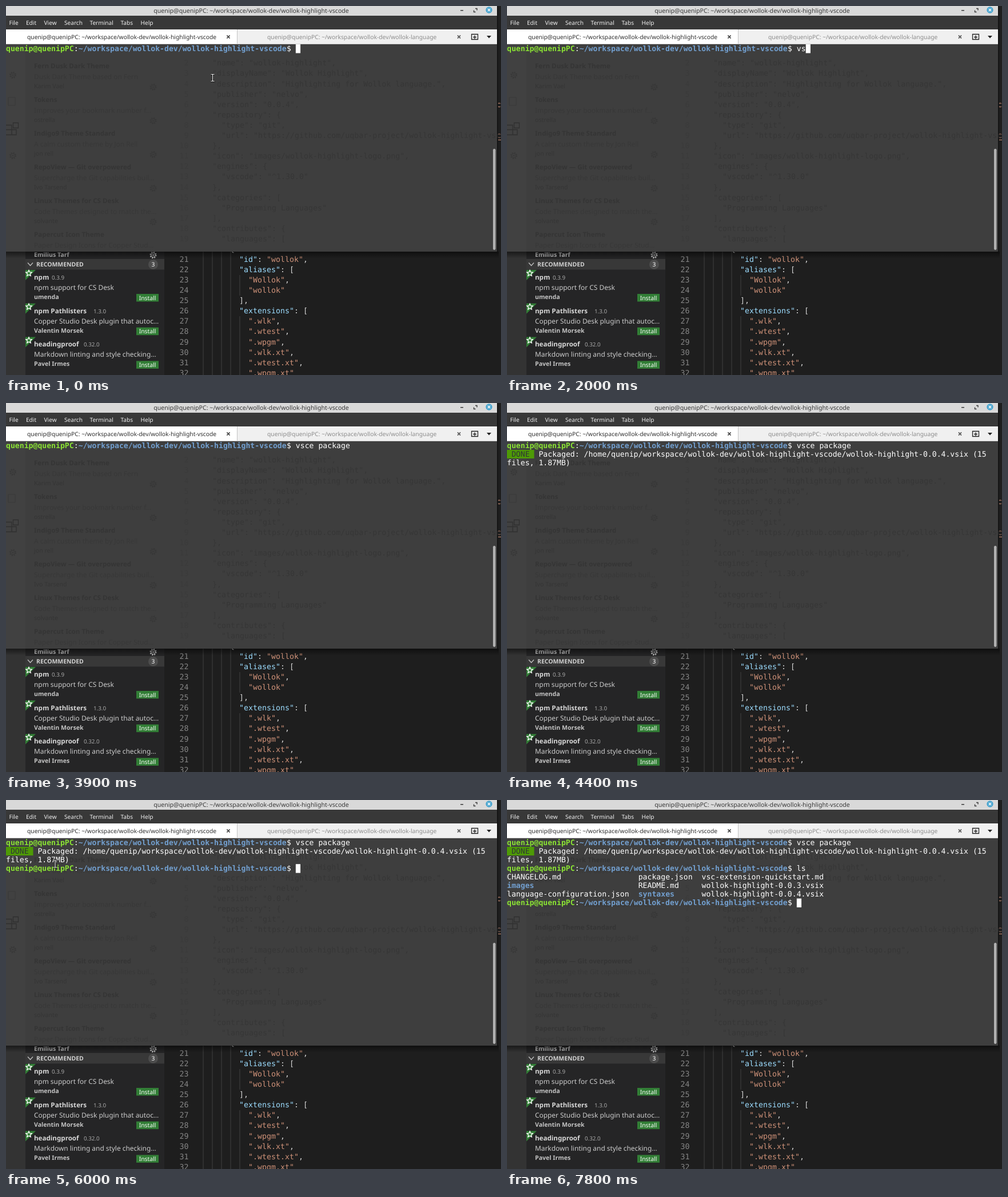
These frames come from a looping animation (866x646 px, 8 s). An HTML page:

```html
<!DOCTYPE html>
<html lang="en">
<head>
<meta charset="utf-8">
<title>Packaging an extension</title>
<style>
html, body { margin: 0; width: 100%; height: 100%; overflow: hidden; background: #1e1e1e; }
svg { display: block; width: 100vw; height: 100vh; }
text { white-space: pre; text-rendering: geometricPrecision; }
.ui { font-family: "Noto Sans", "Open Sans", sans-serif; }
.mono { font-family: "DejaVu Sans Mono", monospace; }
.b { font-weight: bold; }
</style>
</head>
<body>
<svg id="stage" viewBox="0 0 866 646"></svg>
<script>
const LOOP = 8000, COL = 7.92, ROW = 15.06, TOP = 67;
const USER = 'quenip@quenipPC';
const CWD = '~/workspace/wollok-dev/wollok-highlight-vscode';
const GREEN = '#8ae234', BLUE = '#729fcf', WHITE = '#ffffff';
const KEY = '#9cdcfe', STR = '#ce9178', PUN = '#d4d4d4', SHADE = '#323232';

const rect = (x, y, w, h, fill, more = '') =>
  `<rect x="${x}" y="${y}" width="${w}" height="${h}" fill="${fill}" ${more}/>`;
const path = (d, stroke, width = 1, fill = 'none') =>
  `<path d="${d}" stroke="${stroke}" stroke-width="${width}" fill="${fill}"/>`;
const text = (x, y, s, size, fill, cls = 'ui', more = '') =>
  `<text x="${x}" y="${y}" font-size="${size}" fill="${fill}" class="${cls}" ${more}>${s}</text>`;
const cross = (x, y, r, stroke, w) =>
  path(`M${x - r} ${y - r}l${2 * r} ${2 * r}m0 ${-2 * r}l${-2 * r} ${2 * r}`, stroke, w);

const star = (cx, cy) => {
  const pts = Array.from({ length: 10 }, (_, i) => {
    const r = i % 2 ? 2.5 : 5.5, a = i * Math.PI / 5 - Math.PI / 2;
    return (cx + r * Math.cos(a)).toFixed(1) + ' ' + (cy + r * Math.sin(a)).toFixed(1);
  });
  return path(`M${pts.join('L')}Z`, '#fff', 1.3);
};

const gear = (x, y, color) =>
  `<circle cx="${x}" cy="${y}" r="5" fill="none" stroke="${color}" stroke-width="2" stroke-dasharray="2 1.93"/>` +
  `<circle cx="${x}" cy="${y}" r="3.6" fill="none" stroke="${color}"/>` +
  `<circle cx="${x}" cy="${y}" r="1.3" fill="${color}"/>`;

// Editor lines: indent level and source text
const code = [
  [5, '"id": "wollok",'], [5, '"aliases": ['], [6, '"Wollok",'], [6, '"wollok"'], [5, '],'],
  [5, '"extensions": ['], [6, '".wlk",'], [6, '".wtest",'], [6, '".wpgm",'],
  [6, '".wlk.xt",'], [6, '".wtest.xt",'], [6, '".wpgm.xt"']
];
const paint = s => s.replace(/"[^"]*"(:?)|[^"]+/g, (part, colon) => {
  const quoted = part[0] === '"';
  const body = colon ? part.slice(0, -1) : part;
  const color = !quoted ? PUN : colon ? KEY : STR;
  return `<tspan fill="${color}">${body}</tspan>` + (colon ? `<tspan fill="${PUN}">:</tspan>` : '');
});

function editor() {
  let out = rect(277, 0, 589, 646, '#1e1e1e');
  for (const x of [345, 361, 377, 393]) out += rect(x - .5, 430, 1, 216, '#404040');
  out += rect(408.5, 471, 1, 36, '#404040') + rect(408.5, 543, 1, 103, '#404040');
  out += text(392, 430, '{', 13.3, PUN, 'mono') + text(303.5, 430, '20', 13.3, '#858585', 'mono');
  code.forEach(([level, s], i) => {
    const y = 447.7 + i * 18.1;
    out += text(303.5, y, 21 + i, 13.3, '#858585', 'mono');
    out += text(328 + level * 16, y, paint(s), 13.3, PUN, 'mono');
  });
  return out + text(858, 177, 'c', 13.3, STR, 'mono') +
    text(858, 231, 'c', 13.3, STR, 'mono') + rect(859, 234, 7, 1, STR);
}

const offers = [
  ['npm', '0.3.9', 80, 'npm support for CS Desk', 'umenda'],
  ['npm Pathlisters', '1.3.0', 153, 'Copper Studio Desk plugin that autoc…', 'Valentin Morsek'],
  ['headingproof', '0.32.0', 136, 'Markdown linting and style checking…', 'Pavel Irmes']
];

function sidebar() {
  let out = rect(0, 0, 34, 646, '#333333') + rect(34, 0, 243, 646, '#252526');
  out += text(49, 439, 'Emilius Tarf', 10.6, '#c4c4c4', 'ui b') + gear(257.5, 436, '#c5c5c5');
  out += rect(34, 443, 243, 18.5, '#383838') + path('M38 449.5l4.5 5l4.5-5', '#c5c5c5', 1.2);
  out += text(53, 456, 'RECOMMENDED', 10.45, '#d0d0d0', 'ui b');
  out += '<circle cx="257.5" cy="452.5" r="8.5" fill="#4d4d4d"/>';
  out += text(257.5, 456.3, '3', 10.3, '#fff', 'ui', 'text-anchor="middle"');
  offers.forEach(([name, version, vx, about, author], i) => {
    const y = 462 + i * 58.7;
    out += path(`M34 ${y}h18l-18 18z`, 'none', 0, '#327e36') + star(40, y + 6);
    out += text(49, y + 17, name, 11.6, '#d8d8d8', 'ui b');
    out += text(vx, y + 17, version, 9.8, '#a8a8a8');
    out += text(49, y + 35, about, 11.9, '#cccccc');
    out += text(49, y + 51, author, 10.6, '#c4c4c4', 'ui b');
    out += rect(228, y + 42, 39, 13.5, '#327e36');
    out += text(247.5, y + 52.6, 'Install', 10.3, '#fff', 'ui', 'text-anchor="middle"');
  });
  return out;
}

// What shines through the translucent terminal
const dimItems = [
  ['Fern Dusk Dark Theme', 'Dusk Dark Theme based on Fern', 'Karim Vael'],
  ['Tokens', 'Improves your bookmark number f…', 'ostrella'],
  ['Indigo9 Theme Standard', 'A calm custom theme by Jon Rell', 'jon rell'],
  ['RepoView — Git overpowered', 'Supercharge the Git capabilities buil…', 'Ivo Tarsend'],
  ['Linux Themes for CS Desk', 'Code Themes designed to match the…', 'solvante'],
  ['Papercut Icon Theme', 'Paper Design Icons for Copper Stud…', '']
];
const dimCode = [
  '"name": "wollok-highlight",', '"displayName": "Wollok Highlight",',
  '"description": "Highlighting for Wollok language.",', '"publisher": "nelvo",',
  '"version": "0.0.4",', '"repository": {', '  "type": "git",',
  '  "url": "https://github.com/uqbar-project/wollok-highlight-vscode"', '},',
  '"icon": "images/wollok-highlight-logo.png",', '"engines": {', '  "vscode": "^1.30.0"', '},',
  '"categories": [', '  "Programming Languages"', '],', '"contributes": {', '  "languages": ['
];

function backdrop() {
  let out = rect(0, TOP, 859, 363, '#3e3e3e') + rect(0, TOP, 34, 363, '#414141');
  out += '<g opacity=".75">';
  dimItems.forEach(([name, about, author], i) => {
    const y = 109 + i * 59;
    out += text(49, y, name, 11.6, SHADE, 'ui b') + text(49, y + 19, about, 11.9, '#363636');
    out += text(49, y + 35, author, 10.6, SHADE, 'ui');
    if (author) out += gear(257.5, y + 33, '#353535');
  });
  out += '</g><g opacity=".65">';
  dimCode.forEach((s, i) => {
    const y = 104.3 + i * 18.1;
    out += text(361, y, s, 13.3, SHADE, 'mono');
    out += text(319.5, y, i + 2, 13.3, '#393939', 'mono', 'text-anchor="end"');
  });
  out += '</g>';
  out += path('M0 208.5h10v8h8v9h-18M10 216v9M0 216.5h10M12.5 204.5h9v9h-9z', '#303030', 1.3);
  out += gear(12, 121, '#383838') + gear(12, 262, '#383838');
  out += path('M4 160h12v14h-12z', '#393939');
  return out;
}

function chrome() {
  const title = `${USER}: ${CWD}`;
  const menu = [['File', 5.5], ['Edit', 35], ['View', 66.5], ['Search', 102], ['Terminal', 146.5], ['Tabs', 200.5], ['Help', 235.5]];
  let out = rect(0, 0, 859, 17, '#d9d9d9');
  out += text(429, 12, title, 10.63, '#3a3a3a', 'ui', 'text-anchor="middle"');
  out += rect(795, 7, 5, 1.5, '#3c3c3c');
  out += path('M821 4.5h3v3M819 10.5h-0.5v-3M818.500 10.500h3', '#3c3c3c', 1.4);
  out += '<circle cx="845" cy="7" r="5.7" fill="#4aa5cf"/>' + cross(845, 7, 2.2, '#fff', 1.3);
  out += rect(0, 17, 859, 24, '#383838');
  for (const [s, x] of menu) out += text(x, 32.6, s, 10.1, '#f0f0f0');
  out += rect(0, 41, 859, 26, '#f0f0f0') + rect(0, 41, 404, 26, '#ffffff');
  out += rect(404, 41, 1, 26, '#c4c4c4') + rect(0, 66, 859, 1, '#d0d0d0');
  out += text(37, 57.8, title, 10.3, '#303030');
  out += text(457, 57.8, `${USER}: ~/workspace/wollok-dev/wollok-language`, 10.3, '#8c8c8c');
  out += cross(389, 54, 2.6, '#444', 1.5) + cross(792.5, 54, 2.6, '#555', 1.5);
  out += path('M822 49.500h-7.500v9h11v-5M820 51.500v6M817 54.500h6M822 49.500h3.500v4', '#222', 1.3);
  out += path('M841 52h8l-4 4.500z', 'none', 0, '#222');
  out += rect(852, 250, 4.5, 177, '#b0b0b0', 'rx="2.2"');
  return out;
}

function shadow() {
  return '<defs><linearGradient id="fall" x2="0" y2="1"><stop stop-opacity=".5"/>' +
    '<stop offset="1" stop-opacity="0"/></linearGradient></defs>' +
    rect(0, 430, 862, 12, 'url(#fall)') + rect(859, 0, 2, 430, '#151515');
}

// Terminal text placed on the character grid
const cell = (col, row, s, fill = WHITE, bold = false) =>
  text(col * COL, TOP + 12 + row * ROW, s, 13.155, fill, bold ? 'mono b' : 'mono');
const prompt = (row, typed) =>
  cell(0, row, USER, GREEN, true) + cell(15, row, ':') + cell(16, row, CWD, BLUE, true) + cell(62, row, '$ ' + typed);

const packed = () => rect(0, TOP + ROW, 6 * COL, ROW, '#4e9a06') + cell(1, 1, 'DONE', '#2e3436') +
  cell(7, 1, 'Packaged: /home/quenip/workspace/wollok-dev/wollok-highlight-vscode/wollok-highlight-0.0.4.vsix (15') +
  cell(0, 2, 'files, 1.87MB)');

const listing = () => [
  ['CHANGELOG.md', 'package.json', 'vsc-extension-quickstart.md'],
  ['images', 'README.md', 'wollok-highlight-0.0.3.vsix'],
  ['language-configuration.json', 'syntaxes', 'wollok-highlight-0.0.4.vsix']
].map((names, r) => names.map((name, c) => {
  const dir = !name.includes('.');
  return cell([0, 29, 43][c], 4 + r, name, dir ? BLUE : WHITE, dir);
}).join('')).join('');

const last = (keys, t) => keys.reduce((found, key) => key[0] <= t ? key[1] : found, '');
const packKeys = [[1800, 'v'], [2000, 'vs'], [2200, 'vsc'], [2400, 'vsce'],
  [2900, 'vsce p'], [3000, 'vsce pac'], [3100, 'vsce packa'], [3200, 'vsce package']];
const listKeys = [[7500, 'l'], [7600, 'ls']];
const blinks = [400, 1000, 1600, 1800, 3900, 4500, 5100, 5700, 6300, 6900];

function session(t) {
  const first = last(packKeys, t), second = last(listKeys, t);
  let out = prompt(0, first), row = 0, col = 64 + first.length;
  if (t >= 3300) { row = 1; col = 0; }
  if (t >= 4400) { out += packed(); row = 3; }
  if (t >= 4500) { out += prompt(3, second); col = 64 + second.length; }
  if (t >= 7700) { row = 4; col = 0; }
  if (t >= 7800) { out += listing() + prompt(7, ''); row = 7; col = 64; }
  const on = blinks.filter(b => b <= t).length % 2 === 0;
  return out + (on ? rect(col * COL, TOP + row * ROW, COL + .3, 15.5, WHITE) : '');
}

// Pointer: time, x, y
const trail = [[5000, 18, 154], [5100, 48, 152], [5200, 85, 142.5], [5500, 88, 132], [5800, 87, 124],
  [6000, 86, 112], [6200, 95, 100], [6400, 160, 98], [6700, 286, 112]];

function pointer(t) {
  if (t >= 7500 || (t >= 1800 && t < 5000)) return '';
  let x = 361.5, y = 125.5;
  if (t >= 5000) {
    const i = trail.findIndex(p => p[0] > t);
    const [t0, x0, y0] = trail[i < 0 ? trail.length - 1 : i - 1];
    const [t1, x1, y1] = i < 0 ? [t0 + 1, x0, y0] : trail[i];
    const k = i < 0 ? 0 : (t - t0) / (t1 - t0);
    x = x0 + (x1 - x0) * k;
    y = y0 + (y1 - y0) * k;
  }
  const beam = `M${x - 3} ${y - 6}h6m-3 0v12m-3 0h6`;
  return path(beam, '#1c1c1c', 2.8) + path(beam, '#f4f4f4', 1.1);
}

const stage = document.getElementById('stage');
stage.innerHTML = editor() + sidebar() + shadow() + backdrop() + chrome() + '<g id="live"></g>';
const live = document.getElementById('live');
const start = performance.now();
let shown = -1;

function tick() {
  const t = Math.floor((performance.now() - start) % LOOP / 100) * 100;
  if (t !== shown) {
    live.innerHTML = session(t) + pointer(t);
    shown = t;
  }
  requestAnimationFrame(tick);
}
tick();
</script>
</body>
</html>
```
